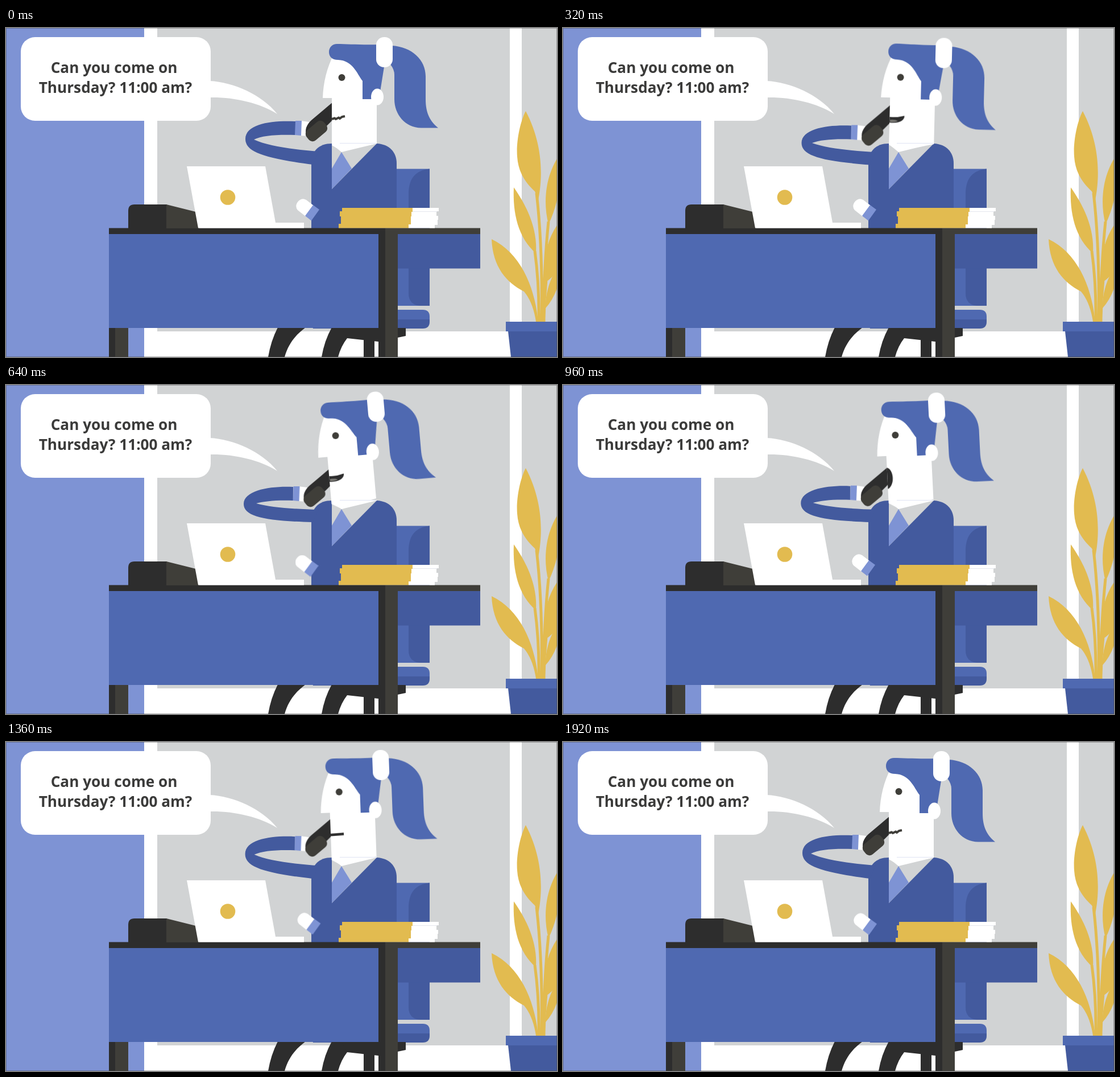
These frames come from a looping animation (969x578 px, 2 s). An HTML page:

```html
<!DOCTYPE html>
<html lang="en">
<head>
<meta charset="utf-8">
<title>Phone call at the desk</title>
<style>
  html, body { margin: 0; width: 100%; height: 100%; overflow: hidden; background: #fff; }
  svg { display: block; width: 969px; height: 578px; }
  .mid { fill: #4f69b1; }
  .deep { fill: #435a9e; }
  .pale { fill: #7e93d4; }
  .grey { fill: #d1d3d4; }
  .white { fill: #fff; }
  .ink { fill: #2d2d2d; }
  .soot { fill: #3f3e39; }
  .gold { fill: #e2bb50; }
  text { font: 700 26.2px "Open Sans", "Noto Sans", sans-serif; fill: #3b3b3a; text-anchor: middle; }

  #head, #arm, #phone, #palm, #mouths > * {
    animation: 2s linear infinite paused;
  }
  #head { animation-name: nod; transform-origin: 608px 213px; }
  #arm, #phone { animation-timing-function: ease-in-out; }
  #arm { animation-name: bend; }
  #phone { animation-name: lower; }
  #palm { animation-name: type; }
  #mouths > * { animation-timing-function: step-end; }
  #rest { animation-name: rest; }
  #open { animation-name: open; }
  #round { animation-name: round; }
  #flat { animation-name: flat; }

  @keyframes nod {
    0%, 84%, to { transform: rotate(0deg); }
    8% { transform: rotate(.8deg); }
    16% { transform: rotate(1.4deg); }
    24% { transform: rotate(-2deg); }
    32%, 36% { transform: rotate(-5deg); }
    48% { transform: rotate(-2.8deg); }
    60% { transform: rotate(-3deg); }
    64% { transform: rotate(-2.75deg); }
    72% { transform: rotate(-1.5deg); }
    76% { transform: rotate(-.8deg); }
    80% { transform: rotate(-.22deg); }
  }
  @keyframes bend {
    0%, 78%, to { d: path("M509 164C468 162 421 168 421 195C421 218 455 229 540 240L550 217C500 213 460 207 436 196C450 189 475 187 509 188Z"); }
    32%, 40% { d: path("M505 179C468 177 418 184 418 209C418 231 455 239 540 241L550 219C505 218 465 215 440 208C455 204 475 202 505 203Z"); }
  }
  @keyframes lower {
    0%, 78%, to { transform: translate(0, 0); }
    32%, 40% { transform: translate(-3.5px, 15px); }
  }
  @keyframes type {
    0%, 16%, to { transform: translate(0, 0); }
    32% { transform: translate(-1.5px, -1.5px); }
    48% { transform: translate(-2px, -3px); }
    60% { transform: translate(.7px, -1.5px); }
    76% { transform: translate(4px, 1px); }
    82% { transform: translate(4.5px, 1.5px); }
    96% { transform: translate(1px, .5px); }
  }
  @keyframes rest {
    0%, 72%, to { opacity: 1; }
    8% { opacity: 0; }
  }
  @keyframes open {
    0%, 40%, to { opacity: 0; }
    8% { opacity: 1; }
  }
  @keyframes round {
    0%, 56%, to { opacity: 0; }
    40% { opacity: 1; }
  }
  @keyframes flat {
    0%, 72%, to { opacity: 0; }
    56% { opacity: 1; }
  }
</style>
</head>
<body>
<svg viewBox="0 0 969 578">
  <!-- room -->
  <path class="white" d="M0 0H969V578H0Z"/>
  <path class="pale" d="M0 0H243V578H0Z"/>
  <path class="grey" d="M266 0H886V533H266ZM907 0H969V533H907Z"/>

  <!-- speech bubble -->
  <rect class="white" x="26" y="16" width="334" height="147" rx="25"/>
  <path class="white" d="M358 93C400 95 450 117 477 151C445 131 400 121 358 122Z"/>
  <text x="190" y="79">Can you come on</text>
  <text x="192.500" y="114">Thursday? 11:00 am?</text>

  <!-- plant -->
  <g class="gold">
    <path d="M914 146C904 165 897 200 899 226C901 256 916 274 930 287L936 302C944 262 945 205 914 146Z"/>
    <path d="M893 280C891 325 900 368 932 396C935 350 914 310 893 280Z"/>
    <path d="M854 371C856 420 880 447 911 463Q927 482 932 516H936C930 455 905 395 854 371Z"/>
    <path d="M970 228C949 262 944 305 954 345Q964 325 970 298Z"/>
    <path d="M970 345C949 375 943 415 949 446Q961 440 970 425Z"/>
    <path d="M970 421C953 445 948 475 949 492Q962 478 970 455Z"/>
    <path fill="none" stroke="#e2bb50" stroke-width="5" d="M933 290Q944 385 942 518M930 392Q938 450 937 518M954 340Q946 420 945 518M950 442Q946 480 946 518"/>
  </g>
  <path class="mid" d="M879 516H969V533H879Z"/>
  <path class="deep" d="M883 533H969V578H888Z"/>

  <!-- chair -->
  <path class="mid" d="M680 247.500H745V488H680Z"/>
  <path class="deep" d="M745 247.500V488H728Q708 486 708 466V289Q709 251 745 247.500Z"/>
  <path class="mid" d="M535 495H733Q745 495 745 507V512H535Z"/>
  <path class="deep" d="M535 512H745V516Q745 528 733 528H540Z"/>

  <!-- legs and chair stand -->
  <g class="ink">
    <path d="M461 578Q466 549 478 526H527C508 540 496 556 490 578Z"/>
    <path d="M555 578Q560 549 573 526H620L600 545Q589 559 584 578Z"/>
    <path d="M590 527H703V541L655 551L600 545ZM629 546H648V578H629Z"/>
  </g>

  <!-- torso -->
  <path class="deep" d="M537 353V236C538 216 550 203 573 203H652C674 204 687 218 687 238V353Z"/>
  <path class="grey" d="M573 203H652L573 283Z"/>
  <path class="pale" d="M590 218L608 247L573 283V247Z"/>
  <path class="white" d="M573 202H652V203L590 218L573 204Z"/>

  <!-- phone arm -->
  <path id="arm" class="deep" d="M509 164C468 162 421 168 421 195C421 218 455 229 540 240L550 217C500 213 460 207 436 196C450 189 475 187 509 188Z"/>
  <g id="phone">
    <path class="white" d="M518 163L533 165V190L518 189Z"/>
    <path class="pale" d="M509 163L520 163L519 189L508 188Z"/>
    <path class="ink" d="M588 119L537 162Q524 174 528 188L562 174L590 146Z"/>
    <rect class="soot" x="526" y="169.500" width="40" height="23" rx="8.500" transform="rotate(-40 546 181)"/>
  </g>

  <!-- head -->
  <g id="head">
    <path class="white" d="M577 45C564 70 558 96 557 123H573V206L590 216L652 203V130L640 60Z"/>
    <path class="mid" d="M582 28C600 28 625 30 656 29L665 68L657 118L642 125H627V93C617 80 610 57 584 56C573 56 568 50 568 42C568 34 574 28 582 28Z"/>
    <path class="mid" d="M678 31C714 33 738 56 738 85V125C738 150 746 164 760 175.500H730C702 175 683 152 683 125V82Q683 73 676 64Z"/>
    <rect class="white" x="651" y="16" width="29" height="53" rx="14"/>
    <ellipse class="white" cx="653" cy="121" rx="11" ry="14.500"/>
    <circle class="soot" cx="590.500" cy="87" r="6"/>
    <g id="mouths">
      <path id="rest" fill="none" stroke="#3f3e39" stroke-width="4" d="M573 160L578 158.500L580 160L585 157.500L587 159L591 156L596 155"/>
      <g id="open">
        <path class="ink" d="M573 157Q587 158 599 154.500C600 162 590 169 573 167Z"/>
        <path fill="#777671" d="M574 162Q583 161 588 164Q582 167 574 166Z"/>
      </g>
      <path id="round" class="ink" d="M573 143.500C585 147 586 175 573 181Z"/>
      <path id="flat" fill="none" stroke="#2d2d2d" stroke-width="4.500" d="M572 162L596 161"/>
    </g>
  </g>
  <path stroke="#dfe3f3" d="M587 202.500H651"/>

  <!-- typing hand -->
  <g id="palm">
    <path class="white" d="M541 312L527 331L513 320Q508 314 512 307Q519 297 528 302Z"/>
    <path class="pale" d="M540 311L551 319L537 338.500L526 330Z"/>
  </g>

  <!-- desk -->
  <path class="ink" d="M181 351.500H667V578H655V527H192V578H181Z"/>
  <path class="soot" d="M192 527H215V578H192ZM667 351.500H834V362H689V578H667Z"/>
  <path class="mid" d="M181 362H655V527H181Z"/>
  <path class="deep" d="M689 362H834V422.500H689Z"/>

  <!-- things on the desk -->
  <path class="ink" d="M215 352V321Q215 310 226 310H283V352Z"/>
  <path class="soot" d="M282 310L334 323L340 352H282Z"/>
  <path class="white" d="M318 243H456L474 342H524V351.500H338Z"/>
  <circle class="gold" cx="390" cy="297.500" r="13.300"/>
  <path class="white" d="M708 316H761V322H757V330H760V337H759V346H754V351.500H708Z"/>
  <path stroke="#e4e6ee" d="M714 322.500H758"/>
  <path class="gold" d="M591 316H715V323H713V331H712V345H708V351.500H585V344H589V331H587V322H591Z"/>

  <rect x=".5" y=".5" width="968" height="577" fill="none" stroke="#444" stroke-opacity=".4"/>
</svg>
<script>
  // The picture advances once every 80 ms, so the paused keyframes are set in steps.
  const LOOP = 2000, STEP = 80;
  const moves = document.getAnimations();
  let start;

  function tick(now) {
    start ??= now;
    const time = Math.floor(((now - start) % LOOP) / STEP) * STEP;
    for (const move of moves) move.currentTime = time;
    requestAnimationFrame(tick);
  }
  requestAnimationFrame(tick);
</script>
</body>
</html>
```
